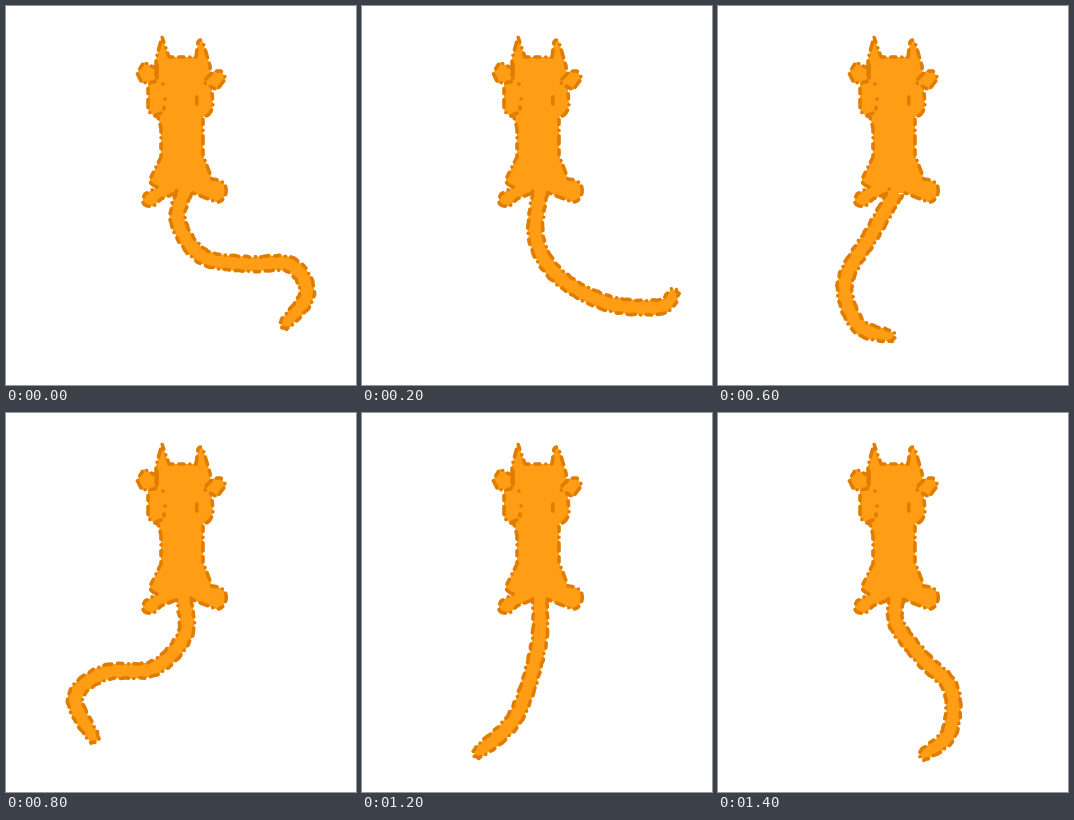
Recreate the animation shown at these times as an HTML page. Size 350 by 379 pixels, loop 1600 ms.

```html
<!DOCTYPE html>
<html lang="en">
<head>
<meta charset="utf-8">
<title>Tail swing</title>
<style>
  html, body { margin: 0; width: 100%; height: 100%; overflow: hidden; background: #fff; }
  svg { display: block; width: 100%; height: 100%; }
  path { fill: #ff9d14; stroke: #e07c00; stroke-width: 3.6; stroke-linecap: round; stroke-linejoin: round; }
  .fur { stroke-dasharray: 8 6 5 6 0 5.5; }
  .line { fill: none; }
</style>
</head>
<body>
<svg viewBox="0 0 350 379">
  <!-- body, open where the tail joins -->
  <path class="fur" d="M170 187L155 193L148 200Q132 202 139 188L151 181Q143 178 144 173L155 151L155 122
    L152 111Q142 108 142 102V79L150 70V53L156 31L163 51H190L192 36Q194 32 197 36L204 60L207 99
    Q205 110 197 111V149L206 173Q222 174 220 187Q217 197 210 196L187 187"/>
  <!-- paws -->
  <path class="fur" d="M151 61L149 76L136 77L131 67L138 56L149 62"/>
  <path class="fur" d="M200 73L208 65H215L220 72L211 84L199 77"/>
  <path class="line" d="M151 58v14m6 6h0m2 15h0m-1 8v2m-8 6l5-2M191 91q-1 3 0 7"/>
  <path class="fur" id="tail"/>
</svg>
<script>
const STEP = 200, HALF = 7.3, ROOT = [178, 186];

// centre line of the tail in each pose, from below the root to the tip
const poses = [
  [172,216, 196,250, 240,258, 285,259, 301,288, 280,317],
  [174,232, 196,270, 245,297, 298,301, 311,289],
  [173,235, 189,300, 213,346],
  [155,226, 127,276, 140,319, 171,330],
  [179,222, 148,255, 98,260, 69,285, 87,324],
  [171,229, 144,270, 100,295, 33,293],
  [176,235, 154,303, 117,339],
  [179,212, 205,246, 233,276, 231,320, 207,341]
];

// Catmull-Rom curve through a flat list of points, sampled about every 4 px
function curve(list) {
  const p = [ROOT], out = [];
  for (let i = 0; i < list.length; i += 2) p.push([list[i], list[i + 1]]);
  const n = p.length;
  for (let i = 0; i < n - 1; i++) {
    const a = p[Math.max(i - 1, 0)], b = p[i], c = p[i + 1], d = p[Math.min(i + 2, n - 1)];
    const steps = Math.ceil(Math.hypot(c[0] - b[0], c[1] - b[1]) / 4);
    for (let k = 0; k < steps; k++) {
      const t = k / steps;
      out.push([0, 1].map(j => b[j] + t / 2 * (c[j] - a[j] +
        t * (2 * a[j] - 5 * b[j] + 4 * c[j] - d[j] + t * (3 * (b[j] - c[j]) + d[j] - a[j])))));
    }
  }
  out.push(p[n - 1]);
  return out;
}

function tailPath(list) {
  const mid = curve(list), last = mid.length - 1, left = [], right = [], cap = [];
  let angle;
  mid.forEach(([x, y], i) => {
    const a = mid[Math.max(i - 1, 0)], b = mid[Math.min(i + 1, last)];
    angle = Math.atan2(b[1] - a[1], b[0] - a[0]);
    const w = HALF - 1.6 * Math.max(0, 1 - (last - i) / 6) + 0.5 * Math.sin(i * 2.1);
    const dx = Math.sin(angle) * w, dy = -Math.cos(angle) * w;
    left.push([x + dx, y + dy]);
    right.unshift([x - dx, y - dy]);
  });
  // tufted tip
  for (let k = 1; k < 8; k++) {
    const a = angle - Math.PI / 2 + k * Math.PI / 8, r = k % 2 ? 5 : 6.4;
    cap.push([mid[last][0] + Math.cos(a) * r, mid[last][1] + Math.sin(a) * r]);
  }
  return "M" + [...left, ...cap, ...right].map(q => q.map(v => v.toFixed(1))).join("L");
}

const tail = document.getElementById("tail");
const paths = poses.map(tailPath);
const start = performance.now();

function draw() {
  const time = performance.now() - start;
  tail.setAttribute("d", paths[Math.floor(time / STEP) % paths.length]);
  requestAnimationFrame(draw);
}
draw();
</script>
</body>
</html>
```
